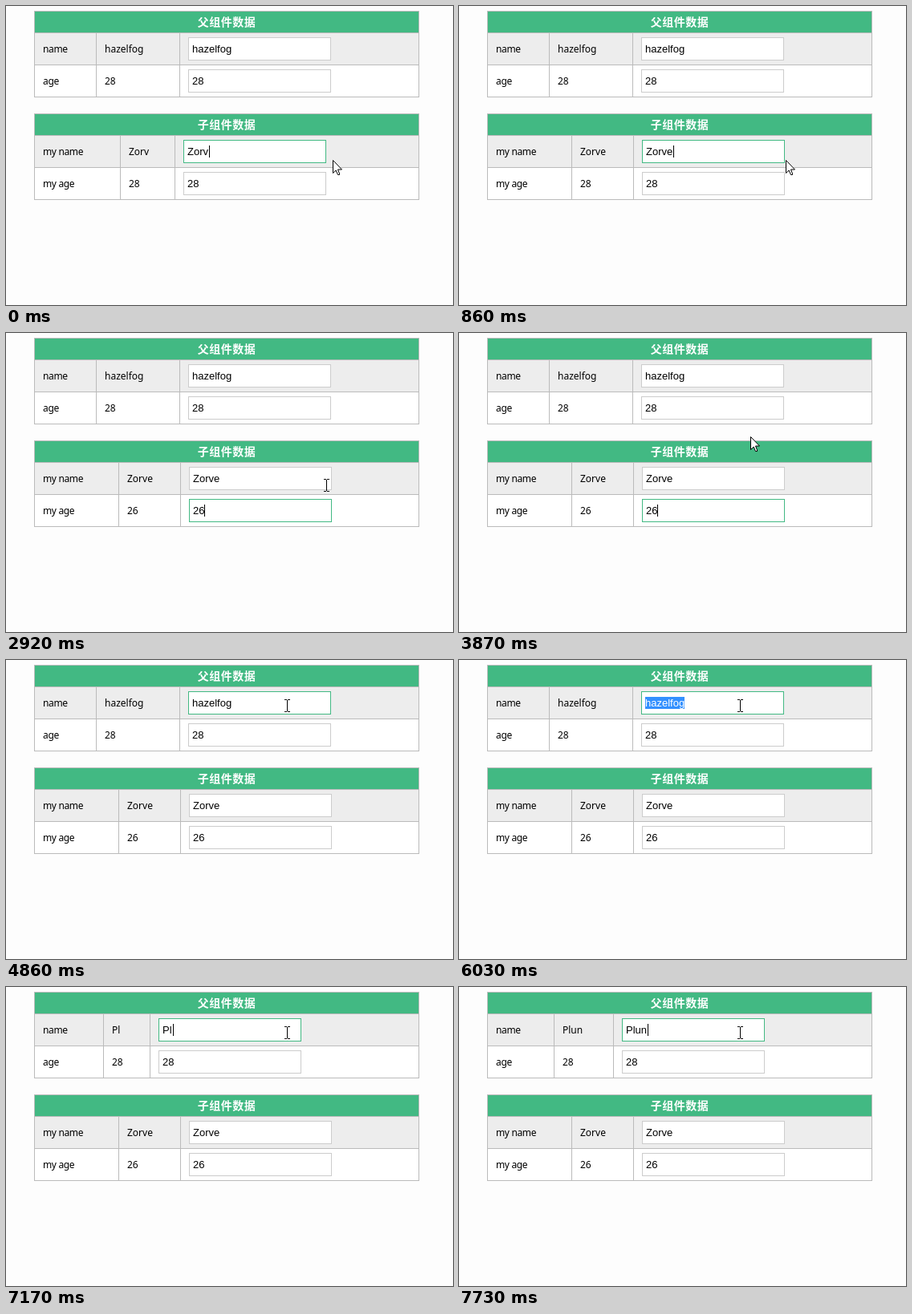
An HTML page that plays this animation: 557x373 px, repeating every 8000 ms.

```html
<!DOCTYPE html>
<html lang="zh">
<head>
<meta charset="utf-8">
<title>组件数据</title>
<style>
html, body { margin: 0; width: 100%; height: 100%; overflow: hidden; background: #fdfdfd; }
svg { display: block; }
rect { shape-rendering: crispEdges; }
text { white-space: pre; }
.title { font: bold 14px "Noto Sans CJK SC", "Noto Sans CJK", sans-serif; letter-spacing: .5px; fill: #fff; text-anchor: middle; }
.cell { font: 12px "Noto Sans", sans-serif; fill: #000; }
.head { letter-spacing: -.35px; }
.input { font: 13px "Liberation Sans", Arial, sans-serif; fill: #000; }
.input.on { fill: #fff; }
</style>
</head>
<body>
<svg id="stage" width="557" height="373" viewBox="0 0 557 373"></svg>
<script>
const LOOP = 8000, GREEN = '#42b983', LINE = '#bbb';
const USER = 'hazelfog', CHILD = 'Zorve', PARENT = 'Plun';

// cols: the two inner column lines; caret and sel: widths from the text start of the focused input
const start = {
  parent: { cols: [112, 216], values: [USER, '28'] },
  child: { cols: [142, 210], values: [CHILD.slice(0, 4), '28'] },
  focus: 'child0', caret: 27, sel: 0, mouse: ['arrow', 407, 192]
};
const child = (name, age) => ({ cols: [140, 217], values: [name, age] });
const parent = (length, a, b) => ({ cols: [a, b], values: [PARENT.slice(0, length), '28'] });
const beam = (x, y) => ['beam', x, y];
const off = { caret: null };

const steps = [
  [0, start],
  [150, off],
  [710, { caret: 27 }],
  [860, { child: child(CHILD, '28'), caret: 34 }],
  [1410, off],
  [1690, { focus: 'child1', sel: 14 }],
  [2120, { child: child(CHILD, '2'), sel: 0, caret: 7, mouse: ['arrow', 407, 193] }],
  [2650, { child: child(CHILD, '26'), caret: 14 }],
  [2920, { mouse: beam(396, 182) }],
  [3070, off],
  [3590, { caret: 14 }],
  [3870, { mouse: ['arrow', 363, 129] }],
  [4020, { mouse: beam(337, 77) }],
  [4170, { caret: null, mouse: beam(318, 44) }],
  [4320, { focus: 'parent0', caret: 49 }],
  [4470, { mouse: beam(343, 48) }],
  [4620, { mouse: beam(346, 49) }],
  [4740, { mouse: beam(347, 49) }],
  [4860, off],
  [5390, { caret: 49 }],
  [5910, off],
  [6030, { sel: 49 }],
  [6310, { parent: parent(0, 121, 179), sel: 0, caret: 0 }],
  [6860, { parent: parent(1, 121, 179), caret: 10 }],
  [7170, { parent: parent(2, 121, 179), caret: 13 }],
  [7450, { parent: parent(3, 120, 184), caret: 20 }],
  [7730, { parent: parent(4, 118, 192), caret: 27 }]
];

const rect = (x, y, w, h, fill) => `<rect x="${x}" y="${y}" width="${w}" height="${h}" fill="${fill}"/>`;
const text = (x, y, kind, s) => `<text x="${x}" y="${y}" class="${kind}">${s}</text>`;

function input(x, y, value, focused, state) {
  const { sel, caret } = state, left = x + 5;
  let out = rect(x, y, 178, 29, focused ? GREEN : '#ccc') + rect(x + 1, y + 1, 176, 27, '#fff');
  if (focused && sel) out += rect(left, y + 7, sel, 15, '#3390ff');
  out += text(left, y + 19, focused && sel ? 'input on' : 'input', value);
  if (focused && caret !== null) out += rect(left + caret, y + 7, 1, 15, '#000');
  return out;
}

function table(id, top, title, labels, state) {
  const { cols: [a, b], values } = state[id];
  let out = rect(35, top, 480, 108, LINE) + rect(36, top + 1, 478, 26, GREEN)
    + text(275, top + 19, 'title', title);
  labels.forEach((label, i) => {
    const y = top + 28 + 40 * i;
    out += rect(36, y, 478, 39, i ? '#fff' : '#ededed')
      + rect(a, y, 1, 39, LINE) + rect(b, y, 1, 39, LINE)
      + text(46, y + 24, 'cell head', label)
      + text(a + 11, y + 24, 'cell', values[i])
      + input(b + 11, y + 5, values[i], state.focus === id + i, state);
  });
  return out;
}

const pointers = {
  arrow: '<path d="M.5 .5V16.5L4.2 13L6.5 18.5H8.5V17L6.5 12H11.5Z" fill="#fff" stroke="#000"/>',
  beam: '<path d="M0 .5h3m1 0h3M3.5 1v14M0 15.5h3m1 0h3" fill="none" stroke="#000" shape-rendering="crispEdges"/>'
};

function draw(state) {
  const [kind, x, y] = state.mouse;
  return table('parent', 6, '父组件数据', ['name', 'age'], state)
    + table('child', 134, '子组件数据', ['my name', 'my age'], state)
    + `<g transform="translate(${x} ${y})">${pointers[kind]}</g>`;
}

const stage = document.getElementById('stage');
let shown = 0;
function tick() {
  const t = performance.now() % LOOP;
  const past = steps.filter(([time]) => time <= t);
  if (past.length !== shown) {
    shown = past.length;
    stage.innerHTML = draw(Object.assign({}, ...past.map(([, change]) => change)));
  }
  requestAnimationFrame(tick);
}
tick();
</script>
</body>
</html>
```
